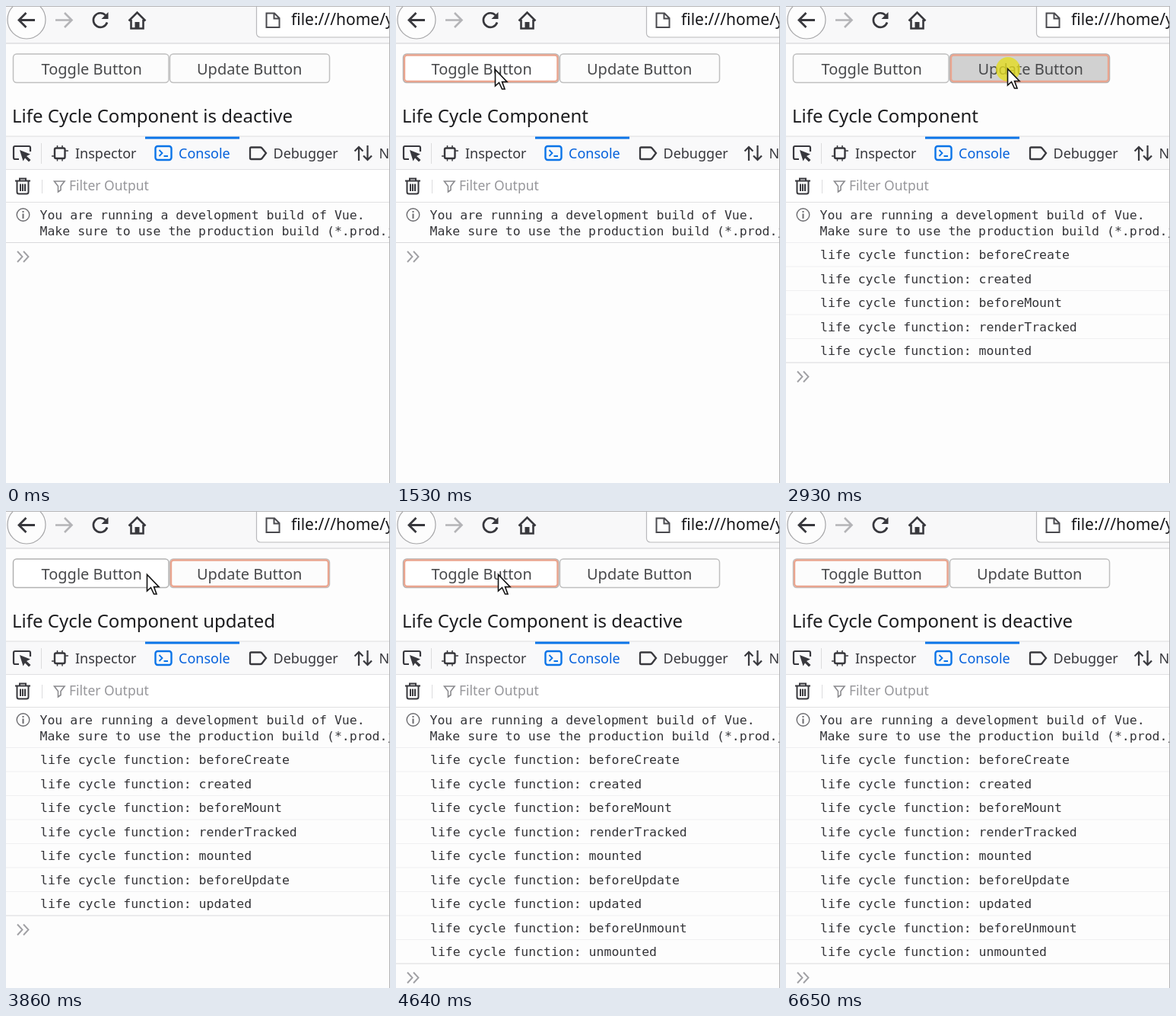
An HTML page with a canvas that plays this animation: 505x626 px, repeating every 7.58 s.

```html
<!DOCTYPE html>
<html lang="en">
<head>
<meta charset="utf-8">
<title>Component life cycle</title>
<style>
html, body { margin: 0; width: 100%; height: 100%; overflow: hidden; background: #fff; }
canvas { display: block; }
</style>
</head>
<body>
<canvas id="stage" width="505" height="626"></canvas>
<script>
const ctx = document.getElementById('stage').getContext('2d');
const W = 505, H = 626, LOOP = 7580, ROW = 31.5;
const UI = '"Noto Sans", "Open Sans", sans-serif';
const MONO = '"DejaVu Sans Mono", monospace';
const INK = '#38383d', BLUE = '#0a74e8';
const HOOKS = ['beforeCreate', 'created', 'beforeMount', 'renderTracked', 'mounted',
  'beforeUpdate', 'updated', 'beforeUnmount', 'unmounted'];

// Pointer moves: start, steps, from, to, arc height, easing power (negative = ease in)
const MOVES = [
  { at: 370, n: 11, from: [545, 640], to: [130, 83], arc: 0, pow: 2 },
  { at: 2160, n: 9, from: [130, 83], to: [291, 82], arc: -22, pow: 2 },
  { at: 3710, n: 7, from: [291, 82], to: [134, 83], arc: 0, pow: 2 },
  { at: 6340, n: 5, from: [134, 83], to: [390, 645], arc: 0, pow: -1.6 }
];
const STEP = 77;

function rect(x, y, w, h, fill) {
  ctx.fillStyle = fill;
  ctx.fillRect(x, y, w, h);
}

function text(str, x, y, size, color, font = UI) {
  ctx.font = `${size}px ${font}`;
  ctx.fillStyle = color;
  ctx.fillText(str, x, y);
}

function box(x, y, w, h, r, stroke, width, fill) {
  ctx.beginPath();
  ctx.roundRect(x, y, w, h, r);
  if (fill) { ctx.fillStyle = fill; ctx.fill(); }
  if (stroke) { ctx.strokeStyle = stroke; ctx.lineWidth = width; ctx.stroke(); }
}

function path(d, stroke, width, fill) {
  const p = new Path2D(d);
  if (fill) { ctx.fillStyle = fill; ctx.fill(p); }
  if (stroke) { ctx.strokeStyle = stroke; ctx.lineWidth = width; ctx.stroke(p); }
}

function disc(x, y, r, fill, stroke, width) {
  ctx.beginPath();
  ctx.arc(x, y, r, 0, Math.PI * 2);
  if (fill) { ctx.fillStyle = fill; ctx.fill(); }
  if (stroke) { ctx.strokeStyle = stroke; ctx.lineWidth = width; ctx.stroke(); }
}

function pointer(t) {
  if (t < 370 || t >= 6650) return null;
  const m = MOVES.filter(move => t >= move.at).pop();
  const k = Math.min(1, (Math.floor((t - m.at) / STEP + 0.05) + 1) / m.n);
  const e = m.pow > 0 ? 1 - (1 - k) ** m.pow : k ** -m.pow;
  const mix = i => Math.round(m.from[i] + (m.to[i] - m.from[i]) * e);
  return { x: mix(0), y: mix(1) + m.arc * Math.sin(Math.PI * e) };
}

function state(t) {
  const on = (a, b) => t >= a && t < b;
  return {
    title: 'Life Cycle Component' + (on(1530, 3080) ? '' : on(3080, 4570) ? ' updated' : ' is deactive'),
    rows: t < 1610 ? 0 : t < 3160 ? 5 : t < 4640 ? 7 : 9,
    focus: t < 1380 ? '' : on(2930, 4490) ? 'update' : 'toggle',
    pressed: on(2930, 3080) ? 'update' : on(1380, 1530) || on(4490, 4570) ? 'toggle' : ''
  };
}

function toolbar() {
  rect(0, 0, W, 49, '#f8f8f9');
  rect(0, 48.5, W, 1, '#cfcfd1');
  disc(27, 18, 25, '#fdfdfd', '#a6a6a8', 1.2);
  path('M38 18.5H17M26.5 9L17 18.5L26.5 28', INK, 2.8);
  path('M65 18.5H86M77 9L86.500 18.5L77 28', '#b4b4b7', 2.6);
  path('M131 12.2A9.3 9.3 0 1 0 133 21.500', INK, 2.7);
  path('M134.500 8V17H125.500Z', null, 0, INK);
  path('M161.500 19.500L172.500 8.500L183.500 19.500M164.500 18V29.500H180.500V18', INK, 2.6);
  rect(169.5, 21, 6, 9, INK);
  box(329.5, -8, 200, 49, 5, '#b9b9bc', 1.2, '#fff');
  path('M342.500 9.500H353L359.500 16V28H342.500ZM352.500 10V16.500H359', '#4a4a4f', 2);
  text('file:///home/y', 375, 25, 21, '#18181b');
  rect(0, 0, W, 1, '#b6b6b8');
}

function button(label, x, w, tx, s, id, hover) {
  const down = s.pressed === id;
  box(x, 63, w, 37.5, 4.5, hover ? '#b2b2b2' : '#bfbfbf', 1.5, down ? '#d1d1d1' : hover ? '#fff' : '#fcfcfc');
  if (s.focus === id) box(x + 1.5, 64.5, w - 3, 34.5, 3.5, '#eaa58f', 2.4);
  text(label, tx + (down ? 1.5 : 0), 90, 20, '#48494b');
}

function tabs() {
  rect(0, 171, W, 43, '#f9f9fa');
  rect(0, 170.5, W, 1, '#dedee0');
  rect(0, 214, W, 1, '#e0e0e2');
  rect(183, 171.5, 124, 3, BLUE);
  rect(46, 180, 1, 27, '#dcdcde');

  path('M17 201H12Q10 201 10 199V186Q10 184 12 184H30Q32 184 32 186V191', INK, 2.2);
  path('M18 189L32 194.500L27 197L32.500 202L30 204.500L25 199.500L22.500 203.500Z', null, 0, INK);

  box(64, 186.5, 13.5, 13.5, 2, INK, 2.4);
  path('M67.500 183V187M74 199V203.500M60 197H64M78 190H82M67.500 199V203.500M74 183V187', INK, 1.5);
  text('Inspector', 91, 199.5, 18, INK);

  box(196.5, 184, 21, 18, 3, BLUE, 2.4);
  path('M201.500 189L205.500 193L201.500 197M207.500 197H213', BLUE, 1.8);
  text('Console', 227, 199.5, 18, '#0561dc');

  path('M322.500 185.500H334.500Q336 185.500 337 187L342 193L337 199.500Q336 201 334.500 201H322.500Q321 201 321 199.500V187Q321 185.500 322.500 185.500Z', INK, 2.3);
  text('Debugger', 351.5, 199.5, 18, INK);

  path('M464 203V185M458.500 190.500L464 185L469.500 190.500M475.500 183V202M470 196.500L475.500 202L481 196.500', INK, 2.2);
  text('Network', 490.5, 199.5, 18, INK);
}

function filterBar() {
  rect(0, 215, W, 42, '#fff');
  rect(0, 257, W, 1, '#e0e0e2');
  rect(47, 228, 1, 18, '#dcdcde');
  path('M12 229.500H32M18 229V226.500H26V229M14.500 230V244Q14.500 246.500 17 246.500H27Q29.500 246.500 29.500 244V230M19 233.500V243M22 233.500V243M25 233.500V243', INK, 2);
  path('M63.500 230H77L72 236.500V241.500L68.500 244V236.500Z', '#8a8a8e', 1.6);
  text('Filter Output', 83, 242, 17.5, '#97979b');
}

function messages(rows) {
  disc(22.5, 274, 8.3, null, '#6c6c70', 1.4);
  rect(21.5, 272.5, 2, 6.5, '#6c6c70');
  rect(21.5, 269, 2, 2, '#6c6c70');
  text('You are running a development build of Vue.', 44.5, 279.5, 16.5, '#333337', MONO);
  text('Make sure to use the production build (*.prod.js)', 44.5, 300.5, 16.5, '#333337', MONO);
  for (let i = 0; i < rows; i++) {
    rect(0, 310 + i * ROW, W, 1, '#efeff1');
    text('life cycle function: ' + HOOKS[i], 45, 332 + i * ROW, 16.5, '#333337', MONO);
  }
  const end = 310 + rows * ROW;
  rect(0, end, W, 1, '#d9d9dc');
  path(`M15 ${end + 12}L21.500 ${end + 19}L15 ${end + 26}M23 ${end + 12}L29.500 ${end + 19}L23 ${end + 26}`, '#a0a0a4', 1.9);
}

function drawPointer(p) {
  ctx.save();
  ctx.translate(p.x, p.y);
  path('M.5 .5V22L5.500 17.500L9.500 26H13L9.500 16.500H16Z', '#111', 1.6, '#fff');
  ctx.restore();
}

function draw(t) {
  const s = state(t), p = pointer(t);
  const over = (a, b) => !!p && p.x >= a && p.x < b && p.y >= 58 && p.y < 101;
  rect(0, 0, W, H, '#fdfdfd');
  toolbar();
  button('Toggle Button', 9.5, 204.5, 46.5, s, 'toggle', over(9, 215));
  button('Update Button', 215.5, 210, 251, s, 'update', over(215, 426));
  text(s.title, 8, 153, 24, '#1c1c1e');
  tabs();
  filterBar();
  messages(s.rows);
  rect(504, 0, 1, H, '#b4b4b6');
  if (p) {
    if (s.pressed) disc(p.x + 1, p.y + 1, 16, 'rgba(228, 220, 30, .78)');
    drawPointer(p);
  }
}

function frame(now) {
  draw(now % LOOP);
  requestAnimationFrame(frame);
}
requestAnimationFrame(frame);
</script>
</body>
</html>
```
